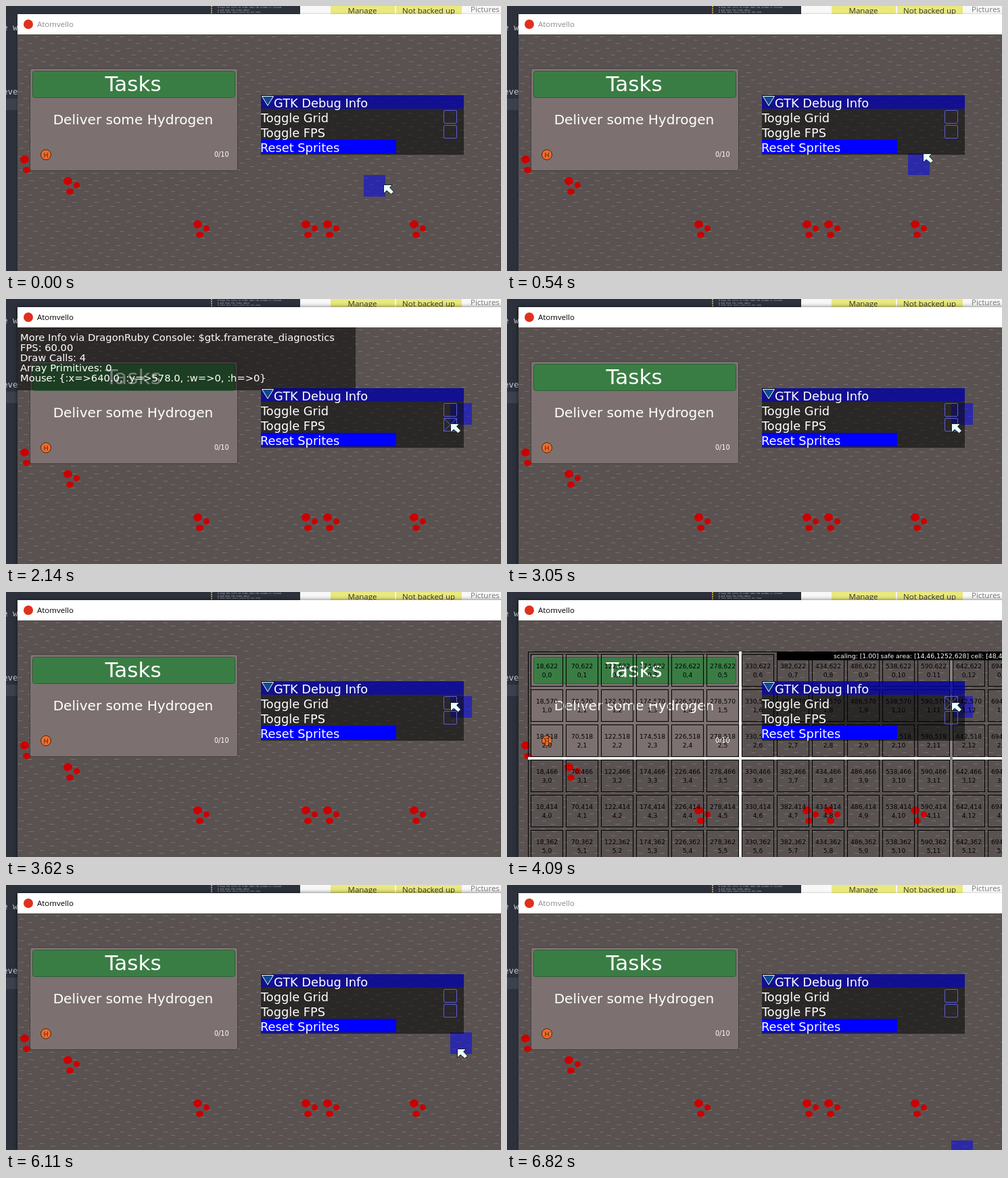
Recreate the animation shown at these times as an HTML page with a canvas. Size 732 by 392 pixels, loop 6.85 s.

```html
<!DOCTYPE html>
<html lang="en">
<head>
<meta charset="utf-8">
<title>Atomvello</title>
<style>
  html, body { margin: 0; width: 100%; height: 100%; overflow: hidden; background: #2c313c; }
  canvas { display: block; }
</style>
</head>
<body>
<canvas id="stage" width="732" height="392"></canvas>
<script>
const ctx = document.getElementById('stage').getContext('2d');
const LOOP = 6850, TILE = 32, LEFT = 17, TOP = 42, TILE_TOP = 26;
const GAME_FONT = '"DejaVu Sans", sans-serif';
const UI_FONT = '"Open Sans", sans-serif';
const CODE_FONT = '"DejaVu Sans Mono", monospace';

function rect(x, y, w, h, color) {
  ctx.fillStyle = color;
  ctx.fillRect(x, y, w, h);
}

function frame(x, y, w, h, color) {
  ctx.strokeStyle = color;
  ctx.lineWidth = 1;
  ctx.strokeRect(x + .5, y + .5, w - 1, h - 1);
}

function roundBox(x, y, w, h, fill, stroke, radius = 3) {
  ctx.beginPath();
  ctx.roundRect(x + .5, y + .5, w - 1, h - 1, radius);
  paint(fill, stroke);
}

function polygon(points, fill, stroke) {
  ctx.beginPath();
  points.forEach(([x, y]) => ctx.lineTo(x, y));
  ctx.closePath();
  paint(fill, stroke);
}

function oval(x, y, rx, ry, fill, stroke) {
  ctx.beginPath();
  ctx.ellipse(x, y, rx, ry, 0, 0, 7);
  paint(fill, stroke);
}

function paint(fill, stroke) {
  ctx.fillStyle = fill;
  ctx.fill();
  if (!stroke) return;
  ctx.strokeStyle = stroke;
  ctx.lineWidth = 1;
  ctx.stroke();
}

function text(str, x, y, size, color = '#fff', font = GAME_FONT, align = 'left') {
  ctx.font = `${size}px ${font}`;
  ctx.fillStyle = color;
  ctx.textAlign = align;
  ctx.fillText(str, x, y);
}

function makeGround() {
  const tile = document.createElement('canvas');
  tile.width = tile.height = TILE;
  const pen = tile.getContext('2d');
  pen.fillStyle = '#595251';
  pen.fillRect(0, 0, TILE, TILE);
  pen.fillStyle = '#756f6c';
  [[1, 4, 6], [17, 8, 7], [9, 14, 6], [24, 19, 6], [3, 24, 6], [15, 29, 7]]
    .forEach(([x, y, w]) => pen.fillRect(x, y, w, 1));
  const pattern = ctx.createPattern(tile, 'repeat');
  pattern.setTransform(new DOMMatrix().translate(LEFT, TILE_TOP));
  return pattern;
}
const ground = makeGround();

function drawDesktop() {
  rect(0, 0, 435, 392, '#2c313c');
  rect(0, 137, LEFT, 17, '#3b414d');
  text('e w', -5, 36, 12.5, '#c5cad3', CODE_FONT);
  text('eve', -5, 131, 12.5, '#c5cad3', CODE_FONT);
  for (let y = 0; y < 12; y += 3) rect(303, y, 2, 2, '#b59a55');
  text('# keep the cells in order when the window is resized', 313, 3, 3, '#c5cad3', CODE_FONT);
  text('# and draw the items above', 313, 6.5, 3, '#c5cad3', CODE_FONT);
  text('# then move every piece by one step', 313, 10, 3, '#c5cad3', CODE_FONT);
  rect(435, 0, 297, 12, '#f8f8f8');
  rect(480, 0, 95, 12, '#e9e97e');
  rect(577, 0, 97, 12, '#e9e97e');
  text('Manage', 527, 11, 11.5, '#333', UI_FONT, 'center');
  text('Not backed up', 625, 11, 11.5, '#333', UI_FONT, 'center');
  text('Pictures', 687, 9, 11.5, '#777', UI_FONT);
}

function drawWindow(focused) {
  ctx.shadowColor = focused ? 'rgba(0,0,0,.6)' : 'rgba(0,0,0,.25)';
  ctx.shadowBlur = focused ? 6 : 3;
  rect(LEFT, 12, 730, 400, '#fff');
  ctx.shadowBlur = 0;
  ctx.shadowColor = 'transparent';
  oval(33, 27, 7, 7, '#e0301e');
  text('Atomvello', 46, 31, 11.5, focused ? '#000' : '#8b8b8b', UI_FONT);
  rect(LEFT, TOP, 715, 350, ground);
}

function drawMolecule(x, y) {
  oval(x + 10.5, y + 9, 6.5, 6, '#cc0000');
  oval(x + 23.5, y + 15, 4.5, 4.5, '#cc0000');
  oval(x + 13.5, y + 24.5, 5.5, 4.5, '#cc0000');
}

function drawTasks() {
  roundBox(35, 92, 308, 152, '#7c7170', '#453e3d');
  roundBox(39, 96, 300, 40, '#3a7d44', '#2b5f36');
  text('Tasks', 188, 126, 31, '#fff', GAME_FONT, 'center');
  text('Deliver some Hydrogen', 188, 175, 20.1, '#fff', GAME_FONT, 'center');
  oval(59, 220, 7.5, 7.5, '#ee6c2b', '#4b2412');
  text('H', 59, 223.5, 9.5, '#4b2412', GAME_FONT, 'center');
  text('0/10', 308, 223, 9.6);
}

function drawGrid() {
  frame(31, 88, 1252, 628, '#000');
  for (let row = 0; row < 6; row++) {
    for (let col = 0; col < 14; col++) {
      const x = 35 + col * 52, y = 92 + row * 52;
      frame(x, y, 48, 48, '#000');
      text(`${18 + col * 52},${622 - row * 52}`, x + 24, y + 21, 9.2, '#000', GAME_FONT, 'center');
      text(`${row},${col}`, x + 24, y + 34, 9.2, '#000', GAME_FONT, 'center');
    }
  }
  rect(31, 244, 701, 4, '#f0f0f0');
  rect(343, 88, 4, 304, '#f0f0f0');
  rect(655, 88, 4, 304, '#858180');
  rect(399, 88, 333, 13, '#000');
  text('scaling: [1.00] safe area: [14,46,1252,628] cell: [48,48] gutter: 4', 483, 98, 9.3);
}

function drawStats() {
  rect(LEFT, TOP, 500, 93, 'rgba(0,0,0,.5)');
  [
    'More Info via DragonRuby Console: $gtk.framerate_diagnostics',
    'FPS: 60.00',
    'Draw Calls: 4',
    'Array Primitives: 0',
    'Mouse: {:x=>640.0, :y=>578.0, :w=>0, :h=>0}'
  ].forEach((line, i) => text(line, 21, 62 + i * 15, 14.7));
}

function drawCheckbox(y, checked) {
  roundBox(647, y, 20, 20, 'transparent', '#5d5dd6', 1.5);
  if (!checked) return;
  ctx.beginPath();
  ctx.moveTo(647, y);
  ctx.lineTo(667, y + 20);
  ctx.moveTo(667, y);
  ctx.lineTo(647, y + 20);
  ctx.stroke();
}

function drawMenu(gridOn, statsOn) {
  rect(377, 132, 300, 20, 'rgba(0,0,160,.8)');
  rect(377, 152, 300, 68, 'rgba(0,0,0,.52)');
  rect(377, 198, 200, 20, '#0000ff');
  polygon([[377, 132], [397, 132], [387, 149]], '#000');
  polygon([[378.5, 133.5], [395.5, 133.5], [387, 147.5]], '#0b4a94', '#fff');
  text('GTK Debug Info', 396, 150, 17.8);
  text('Toggle Grid', 377, 172, 17.8);
  text('Toggle FPS', 377, 194, 17.8);
  text('Reset Sprites', 376, 216, 17.8);
  drawCheckbox(154, gridOn);
  drawCheckbox(176, statsOn);
}

function drawCursor(x, y) {
  ctx.save();
  ctx.translate(Math.round(x), Math.round(y));
  polygon([[.5, .5], [13.5, .5], [9.5, 4.5], [15.5, 11], [11.5, 14.5], [5, 9], [.5, 13.5]],
    '#e8ffff', '#1c2022');
  ctx.restore();
}

// The pointer moves in discrete steps, spread evenly from the first change to the last.
const MOVES = [
  { start: 180, end: 810, steps: 20, from: [558, 264], to: [657, 184] },
  { start: 3510, end: 3620, steps: 5, from: [657, 184], to: [657, 163] },
  { start: 5980, end: 6330, steps: 13, from: [657, 163], to: [686, 402] }
];

function pointerAt(t) {
  let pos = MOVES[0].from;
  for (const { start, end, steps, from, to } of MOVES) {
    if (t < start) break;
    const step = Math.floor((t - start) / (end - start) * (steps - 1) + 1e-6) + 1;
    const p = Math.min(1, step / steps);
    const eased = p * p * (3 - 2 * p);
    pos = from.map((v, i) => v + (to[i] - v) * eased);
  }
  return pos;
}

const snap = (v, origin) => origin + Math.floor((v - origin) / TILE) * TILE;

function draw(t) {
  const [x, y] = pointerAt(t);
  const focused = t >= 1280 && t < 6820;
  const statsOn = t >= 2140 && t < 3050;
  const gridOn = t >= 4090 && t < 5360;
  drawDesktop();
  drawWindow(focused);
  [[17, 218], [81, 250], [273, 314], [433, 314], [465, 314], [593, 314]]
    .forEach(([mx, my]) => drawMolecule(mx, my));
  rect(snap(x, LEFT), snap(Math.min(y, 391), TILE_TOP), TILE, TILE, 'rgba(0,0,255,.5)');
  drawTasks();
  if (gridOn) drawGrid();
  if (statsOn) drawStats();
  drawMenu(gridOn, statsOn);
  drawCursor(x, y);
}

const began = performance.now();
function tick() {
  draw((performance.now() - began) % LOOP);
  requestAnimationFrame(tick);
}
tick();
</script>
</body>
</html>
```
